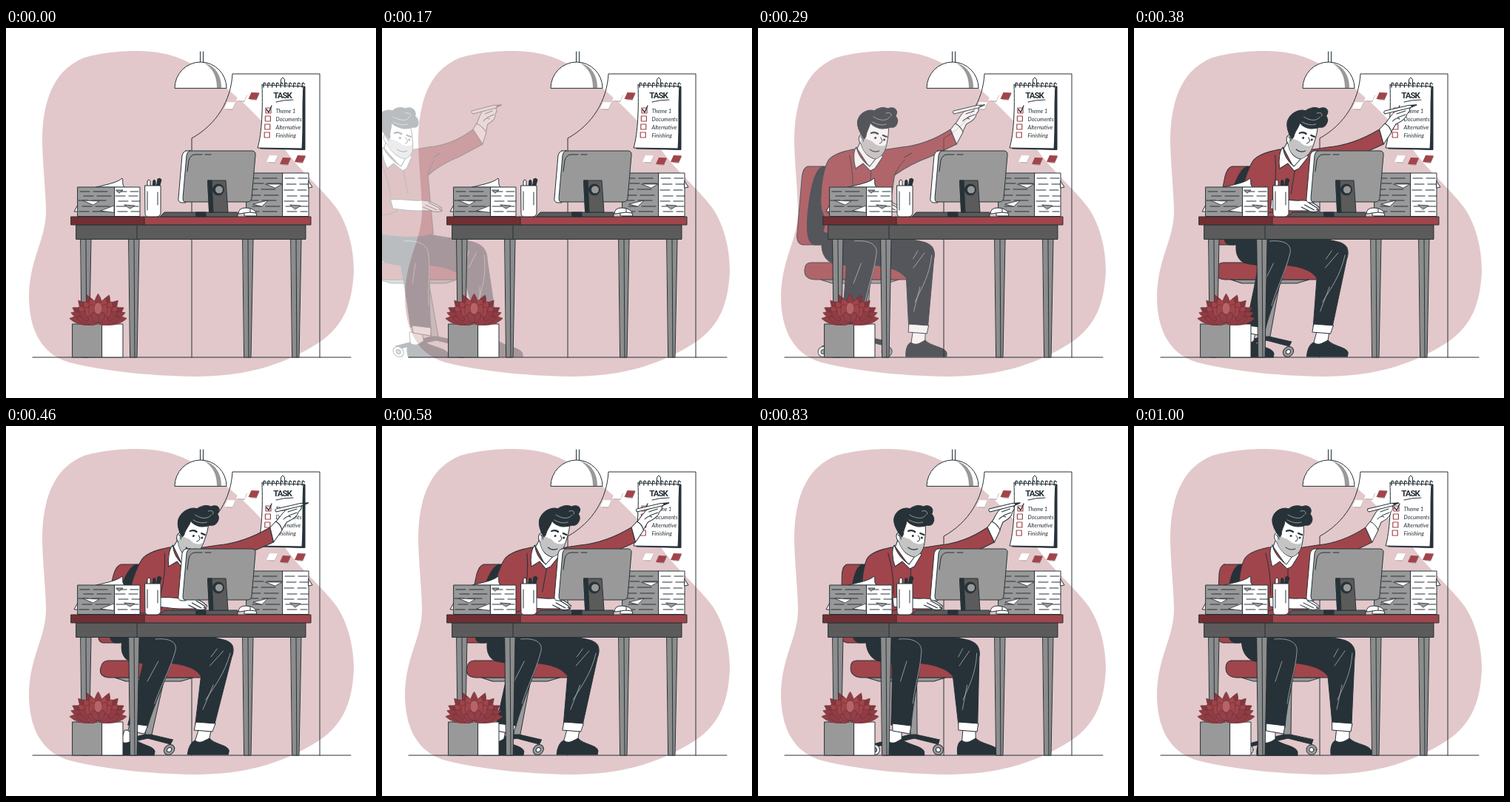
Recreate the animation shown at these times as an HTML page. Size 500 px wide and 500 px high, loop 1040 ms.

```html
<!DOCTYPE html>
<html lang="en">
<head>
<meta charset="utf-8">
<title>At the desk</title>
<style>
  html, body { margin: 0; width: 100%; height: 100%; overflow: hidden; background: #fff }
  svg { display: block; width: 100vw; height: 100vh }
  .o { stroke: #263238; stroke-linejoin: round; stroke-linecap: round }
  .l { fill: none }
  .w { fill: #fff }
  .r { fill: #a0454b }
  .d { fill: #263238 }
  .g { fill: #999 }
  .k { fill: #5b5b5b }
  .h { fill: none; stroke: #a9b0b3; stroke-width: .8; stroke-linecap: round }
  .task { font: bold 11.5px Roboto, sans-serif; letter-spacing: -1px; text-anchor: middle; fill: #263238 }
  .note { font: italic 7.4px Lato, sans-serif; fill: #263238 }
</style>
</head>
<body>
<svg viewBox="0 0 500 500">
  <path fill="#e2c8ca" d="M178 31C222 31 252 46 278 66C320 97 350 128 376 163C398 194 427 217 447 244C463 268 470 300 470 328C468 375 455 407 415 430C370 457 320 471 254 471C190 470 130 463 86 452C44 440 31 402 31 362C32 310 55 285 54 245C53 210 49 180 49 148C50 103 62 57 106 40C130 33 155 31 178 31Z"/>

  <!-- wall -->
  <g class="o">
    <path class="l" d="M36 445H466M251 445V149C285 130 304 98 306 62H424V445M262.5 32V46M266.5 32V46"/>
    <path class="w" d="M228 81A35 35 0 0 1 298 81Z"/>
    <path class="g" stroke="none" d="M267 47C283 51 291 64 291 81H285C285 66 280 54 267 47Z"/>
  </g>
  <g id="stickies"></g>

  <!-- task pad -->
  <g class="o">
    <path class="d" d="M349 79H404V164.500L344 163Z"/>
    <path class="w" d="M346 77L402 79C400 105 402 135 400 163L340 162C346 142 347 108 346 77Z"/>
    <path id="rings" class="l" stroke-width="1.300"/>
    <path class="l" d="M371.500 77V70Q374 64 376.500 70V77M365 100Q375 97 388 97"/>
    <text class="task" x="373.500" y="95" stroke="none">TASK</text>
    <g id="list" stroke="none"></g>
    <path class="l" stroke-width="1.300" d="M352 110L355 114L359 105"/>
  </g>

  <!-- man and chair -->
  <g id="man" class="o">
    <path class="d" d="M206 416L152 430L153 434L208 422L240 430L242 424Z"/>
    <path class="g" d="M202 345H213L212 417H203Z"/>
    <path class="g" d="M146 340H252L236 345H162Z"/>
    <circle class="w" cx="154" cy="437.500" r="7"/><circle class="g" cx="154" cy="437.500" r="3"/>
    <circle class="g" cx="240" cy="437.500" r="7"/><circle class="w" cx="240" cy="437.500" r="3"/>
    <path class="r" d="M122 187H143V293H120C112 291 111 283 112 275L115 200C116 192 118 188 122 187Z"/>
    <path class="d" d="M143 187C132 190 127 215 125 250C124 275 126 291 136 293H156V187Z"/>
    <path class="r" d="M132 317H262Q267 318 267 323V340H138Q124 339 124 327Q124 317 132 317Z"/>

    <g id="shoe">
      <path class="w" d="M274 410H291V428H272Z"/>
      <path class="d" d="M266 444C265 433 268 427 272 425C278 430 285 426 291 422C300 431 317 430 321 439V444Z"/>
    </g>
    <use href="#shoe" x="-100" y="1"/>
    <path class="d" d="M200 270C235 285 270 284 286 290C297 294 300 303 298 313L294 403H268L262 338C250 322 220 320 190 318Z"/>
    <path class="w" d="M268 400L295 402L293 413L268 411Z"/>
    <path class="d" d="M147 272C143 295 146 310 160 317C168 320 175 319 180 321C180 350 178 380 177 404L204 407C207 370 218 335 220 303C221 290 215 283 195 272Z"/>
    <path class="w" d="M179 402L204 405L202 416L179 412Z"/>
    <path class="h" d="M190 288C210 286 222 293 220 306C218 330 210 352 207 375M295 307C293 335 284 350 275 370M276 301L270 312M285 304L271 324M200 318L191 345M281 350L274 383"/>

    <path class="r" d="M182 164C168 167 154 171 149 180C142 196 141 215 142 238C143 251 149 254 149 262L147 276C180 285 215 284 232 278L240 199C252 190 268 181 287 174L322 157L313 137C292 151 270 159 248 161L222 165Z"/>
    <path class="l" d="M178 172C184 195 185 215 184 228M151 250C165 256 178 252 190 247M253 178Q245 186 240 199M262 169L252 175M208 193V224"/>
    <path class="w" d="M183 232C197 230 210 234 224 233C235 232 244 238 250 243Q251 246 246 245L250 247Q243 250 234 247L214 247C203 247 193 245 184 244Z"/>
    <path class="l" d="M229 239L243 246M234 236L248 244M225 242L236 247"/>

    <path class="w" d="M319 130C323 124 325 118 330 113L344 107C350 104 354 106 349 109C351 111 349 114 347 116C347 122 340 127 334 130L329 142Z"/>
    <path class="w" d="M313 137L319 129Q327 133 330 141L322 157Z"/>
    <path class="l" d="M333 116L344 112M335 121L345 117M329 126Q334 120 338 123"/>
    <path class="w" d="M316 112L347 104.500L357 104L349 108L317 116Q314 114 316 112Z"/>
    <path class="d" d="M350 104.500L358 104L352 106.500Z"/>

    <path class="w" d="M194 148L188 163L206 189L217 176L216 166Z"/>
    <path class="w" d="M187 161C183 164 183 178 187 190L197 183L207 193L213 190L223 174C221 170 219 168 217 172L206 187C197 181 189 171 187 161Z"/>
    <path class="w" d="M199 126L229 134C230 142 229 148 228 154C227 167 222 174 213 177C204 175 197 168 193 157C189 153 188 146 193 144Z"/>
    <path fill="#c4c4c4" stroke="none" d="M193 145C198 152 206 150 211 156C216 160 223 161 227 157C225 169 220 175 213 176.500C203 174 196 167 193 156Z"/>
    <path class="d" d="M197 150C191 143 184 130 188 122C191 114 201 109 209 112C215 107 222 107 227 109C236 105 242 112 238 119C244 125 240 136 232 134C222 138 211 136 204 128C204 135 199 139 199 147Z"/>
    <path class="h" d="M208 120C218 126 227 126 230 120M225 115Q233 113 232 119M207 127Q218 133 226 130"/>
    <path class="l" stroke-width="2.200" d="M206 142Q211 140 215 143M222 145L227 147"/>
    <path class="l" d="M219 148Q224 154 218 156M205 164Q211 169 218 166M192 147Q195 148 196 153"/>
    <circle class="d" cx="212" cy="148.500" r="1"/><circle class="d" cx="224" cy="151" r="1"/>
  </g>

  <!-- desk -->
  <g id="legs" class="o"></g>
  <g class="o">
    <path class="k" d="M95 266H405V285.500H95ZM177 266V285.500"/>
    <path class="r" d="M187 255H412V266H187Z"/>
    <path fill="#722f33" d="M88 255H187V266H88Z"/>
  </g>

  <!-- paper stacks -->
  <g class="o">
    <path class="w" d="M122 215C138 211 150 209 157 203C159 207 156 211 160 215Z"/>
    <path class="w" d="M97 239L92 248H98Z"/>
    <path class="g" d="M97 215H147V254.500H97Z"/><path class="w" d="M147 215H181V254.500H147Z"/>
    <path class="g" d="M325 196H374V254.500H325Z"/><path class="w" d="M374 196H409V254.500H374Z"/>
    <path class="w" d="M409 207L414 215L409 216Z"/>
    <path class="l" stroke-dasharray="13 5 19 7 9 4" d="M100 221H144M105 227H146M98 233H140M103 241H147M99 248H143M150 221H179M148 227H178M152 234H181M149 241H179M151 248H180M329 203H372M335 210H374M327 218H370M331 226H374M328 233H370M333 241H373M329 248H371M377 203H407M379 211H409M376 219H406M380 227H409M376 234H407M378 241H408M380 248H407"/>
    <path class="w" stroke-width=".8" d="M104 233L126 234L118 239ZM128 247L146 240V249ZM351 211L373 211L364 216ZM334 238L354 233L346 241Z"/>
    <path class="g" stroke-width=".8" d="M160 239L174 240L168 244ZM149 219L158 219L153 223ZM384 239L398 240L391 245Z"/>
  </g>

  <!-- cup, keyboard, screen, mouse -->
  <g class="o">
    <path class="w" d="M191 216V207Q193 203 195 207V216Z"/>
    <path class="d" d="M198 216L199 206Q201 204 202 207V216ZM203 216L205 204Q208 202 210 205L207 216Z"/>
    <path class="w" d="M188 213H209V251Q208 255 204 255H192Q188 255 188 251Z"/>
    <path class="l" d="M191 221V246M205 222V239"/>
    <path class="k" d="M209 254L214 249H313V255H209Z"/>
    <path class="d" d="M257 249H270V255H257Z"/>
    <path class="w" d="M243 166H250L243 236H237Q232 235 233 230L238 172Q239 167 243 166Z"/>
    <path class="g" d="M248 166H333Q338 167 337 172L332 230Q331 235 326 235H241Q239 234 239 230L244 172Q245 167 248 166Z"/>
    <path class="l" d="M245 194L247 179Q249 171 256 171H265M269 171H277"/>
    <path class="k" d="M273 206H297L300 249H275Z"/>
    <path class="d" d="M273 206H278L280 249H275Z"/>
    <circle class="d" cx="287" cy="218.500" r="7.500"/><circle class="g" cx="288" cy="218.500" r="5.500"/>
    <path class="w" d="M314 251Q314 243 324 243Q338 243 339 254H322V250Q318 251 314 251ZM322 250Q330 248 338 250M330 244V249"/>
  </g>

  <!-- plant -->
  <g class="o"><path class="g" d="M90 400H130V445H90Z"/><path class="w" d="M130 400H158V445H130Z"/></g>
  <g id="plant" stroke="#722f33" stroke-width=".6"></g>
</svg>
<script>
const $ = id => document.getElementById(id);
const INK = '#263238', RED = '#a0454b';

const sticky = ([x, y, color]) =>
  `<path fill="#b9a8aa" d="M${x + 2} ${y + 1}l9 1l4 -9l-2 -1Z"/><path fill="${color}" d="M${x} ${y}l4 -9l11 .5l-4 9Z"/>`;
$('stickies').innerHTML = [
  [295, 109, '#fff'], [311, 98, '#fff'], [327.5, 96, RED],
  [352, 181, '#fff'], [370, 184, RED], [390, 181, RED]
].map(sticky).join('');

let rings = '';
for (let x = 348; x < 402; x += 5.8) rings += `M${x} 80v-5q2 -2 3 1`;
$('rings').setAttribute('d', rings);

$('list').innerHTML = ['Theme 1', 'Documents', 'Alternative', 'Finishing'].map((text, i) =>
  `<rect x="${351 - i * .6}" y="${108 + i * 11}" width="7" height="7" fill="#fff" stroke="${RED}" stroke-width="1.2"/>
   <text class="note" x="364.5" y="${114.5 + i * 11}">${text}</text>`).join('');

$('legs').innerHTML = [101, 166, 320, 385].map(x =>
  `<path fill="#8c8c8c" d="M${x} 285.5h14l-3 159.500h-9ZM${x + 7} 285.5l1 159.500"/>`).join('');

// each leaf: angle from upright, length, half width, colour
const leaf = (angle, length, half, color) =>
  `<path fill="${color}" transform="translate(124.5 398) rotate(${angle})" d="M0 0C${-half} ${-length * .3} ${-half} ${-length * .7} 0 ${-length}C${half} ${-length * .7} ${half} ${-length * .3} 0 0Z"/>`;
const layer = (angles, length, half, color) =>
  angles.map(a => leaf(a, length, half, color) + (a ? leaf(-a, length, half, color) : '')).join('');
$('plant').innerHTML =
  layer([22, 42, 60], 40, 9, '#823840') +
  layer([0, 70, 82], 39, 8, '#8f3d44') +
  layer([52, 34, 17], 34, 10, RED) +
  layer([78, 62], 30, 8, '#8f3d44') +
  layer([40, 22], 27, 9, RED) +
  '<ellipse cx="124.5" cy="379" rx="5.500" ry="8" fill="#b5646a"/>' +
  layer([84, 60, 30], 16, 6, '#93404a');

// cubic-bezier(.36, -.01, .5, 1.38): overshoots before it settles
function ease(x) {
  const at = (a, b, s) => 3 * a * s * (1 - s) ** 2 + 3 * b * s * s * (1 - s) + s ** 3;
  let low = 0, high = 1;
  for (let i = 0; i < 24; i++) {
    const mid = (low + high) / 2;
    if (at(.36, .5, mid) < x) low = mid; else high = mid;
  }
  return at(-.01, 1.38, low);
}

const LOOP = 1040, MID_Y = 274;
const tan = degrees => Math.tan(degrees * Math.PI / 180);
// time, horizontal shift, skew, opacity
const KEYS = [
  [0, -239, tan(20), 0],
  [576, 0, tan(-10), 1],
  [768, 0, tan(2), 1],
  [960, 0, 0, 1],
  [LOOP, 0, 0, 1]
];

function draw(now) {
  const t = now % LOOP;
  const i = KEYS.findIndex(key => t < key[0]);
  const from = KEYS[i - 1], to = KEYS[i];
  const p = ease((t - from[0]) / (to[0] - from[0]));
  const [, shift, skew, alpha] = from.map((v, n) => v + (to[n] - v) * p);
  $('man').setAttribute('transform', `matrix(1 0 ${skew} 1 ${shift - skew * MID_Y} 0)`);
  $('man').setAttribute('opacity', Math.min(1, Math.max(0, alpha)));
}

const start = performance.now();
function tick() {
  draw(performance.now() - start);
  requestAnimationFrame(tick);
}
tick();
</script>
</body>
</html>
```
